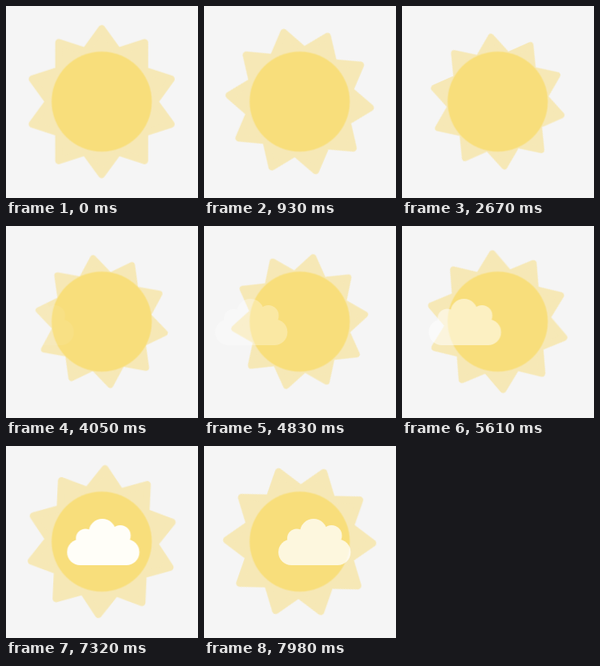
An HTML page that plays this animation: 240 px wide and 240 px high, repeating every 8 s.

```html
<!DOCTYPE html>
<html lang="en">
<head>
<meta charset="utf-8">
<title>Sun and cloud</title>
<style>
  html, body { margin: 0; height: 100%; overflow: hidden; background: #f5f5f5; }
  svg { display: block; width: 100vw; height: 100vh; }

  #spin { animation: spin 8s linear infinite; }
  #pulse { animation: pulse 4s cubic-bezier(.37, 0, .63, 1) -.34s infinite alternate; }
  #cloud { animation: drift 8s linear infinite, fade 8s linear infinite; }

  #rays { fill: #f6e8b6; stroke: #f6e8b6; stroke-width: 9; stroke-linejoin: round; }
  #disc { fill: #f8de7b; }
  #cloud { fill: #fff; }

  @keyframes spin {
    0% { transform: rotate(0deg); }
    50% { transform: rotate(98.9deg); }
    100% { transform: rotate(199.7deg); }
  }
  @keyframes pulse {
    from { transform: scale(1); }
    to { transform: scale(.871); }
  }
  @keyframes drift {
    from { transform: translateX(-107.2px); }
    to { transform: translateX(93.4px); }
  }
  @keyframes fade {
    0%, 47.5% { opacity: 0; }
    89.4% { opacity: 1; }
    100% { opacity: .746; }
  }
</style>
</head>
<body>
<svg viewBox="0 0 240 240">
  <g transform="translate(119.6 119.5)">
    <g id="pulse"><g id="spin"><polygon id="rays"/></g></g>
    <circle id="disc" r="62.6"/>
  </g>
  <g id="cloud">
    <rect y="116.5" width="90.4" height="32.5" rx="16.25"/>
    <circle cx="23" cy="115.5" r="12"/>
    <circle cx="44" cy="108" r="17"/>
    <circle cx="66.5" cy="112" r="13"/>
  </g>
</svg>
<script>
  // Ten-pointed star; the round stroke joins soften its tips.
  const TIP = 91.4, NOTCH = 66.4;
  const points = Array.from({ length: 20 }, (_, i) => {
    const angle = i * Math.PI / 10;
    const radius = i % 2 ? NOTCH : TIP;
    return [radius * Math.sin(angle), -radius * Math.cos(angle)];
  });
  document.getElementById('rays').setAttribute('points', points.join(' '));
</script>
</body>
</html>
```
